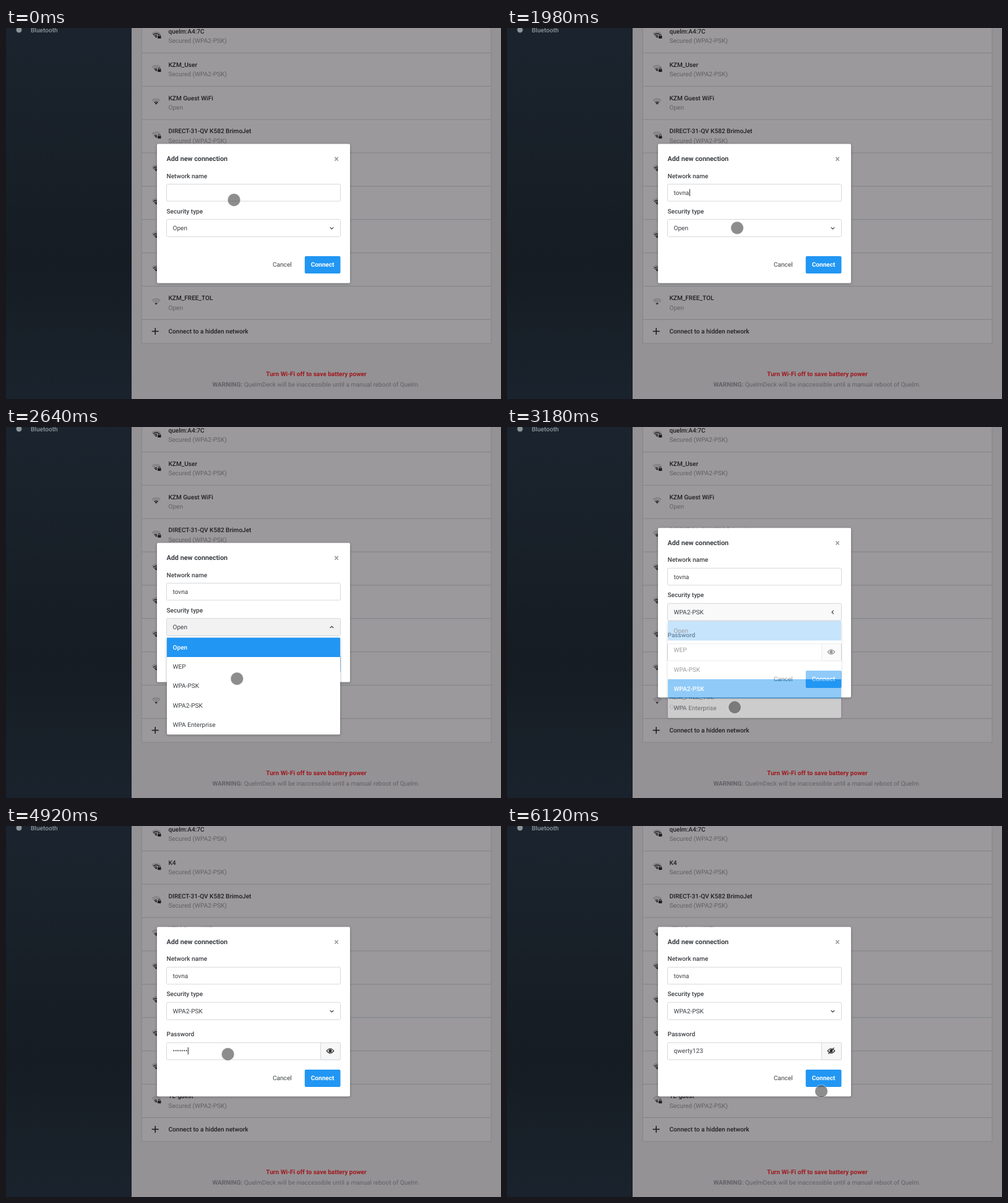
An HTML page for the animation above (6.18 s loop, 800 by 600 pixels).

```html
<!DOCTYPE html>
<html lang="en">
<head>
<meta charset="utf-8">
<title>Add new connection</title>
<style>
  html, body { margin: 0; width: 100%; height: 100%; overflow: hidden; background: #949295; }
  svg { display: block; }
  text { font: 10.08px Roboto, sans-serif; fill: #3c3f43; text-rendering: geometricPrecision; white-space: pre; }
  .m { font-weight: 500; }
  .b { font-weight: 700; }
  .box { fill: #fff; stroke: #d6d8dc; }
  .line { fill: none; stroke: #818386; }
</style>
</head>
<body>
<svg id="stage" width="800" height="600" viewBox="0 0 800 600"></svg>
<script>
const LOOP = 6180, STEP = 60;
const NAME = 'tovna', PASSWORD = 'qwerty123';
const OPTIONS = ['Open', 'WEP', 'WPA-PSK', 'WPA2-PSK', 'WPA Enterprise'];
const ROW_H = 31.3, BLUE = '#2196f3';

// y is the middle of the capitals
const text = (x, y, s, attrs = '') => `<text x="${x}" y="${y + 3.6}" ${attrs}>${s}</text>`;
const rect = (x, y, w, h, attrs) => `<rect x="${x}" y="${y}" width="${w}" height="${h}" ${attrs}/>`;

function wifi(x, y, level, locked) {
  const arcs = [1.6, 4.2, 6.8, 9.3].map((r, i) => {
    const d = r * 0.72;
    return `<path d="M${-d} ${-d}A${r} ${r} 0 0 1 ${d} ${-d}" fill="none"
      stroke="${i <= level ? '#1c1b1e' : '#7c7a7e'}" stroke-width="${i ? 1.4 : 2.4}"/>`;
  }).join('');
  const lock = locked ? rect(1.4, -5.2, 7, 6.5, 'fill="#9b999b"') +
    rect(2.4, -3.2, 5.4, 4.2, 'rx=".5" fill="#1c1b1e"') +
    '<path d="M3.6-3v-1a1.5 1.5 0 0 1 3 0v1" fill="none" stroke="#1c1b1e"/>' : '';
  return `<g transform="translate(${x} ${y + 5})">${arcs}${lock}</g>`;
}

function networks(id, rows) {
  return `<g id="${id}">` + rows.map(([name, level, locked], i) => {
    const y = 5 + i * 53.95;
    return wifi(242.7, y + 6, level, locked) + (name
      ? text(262.5, y, name, 'class="m" style="fill:#1f1e21"') +
        text(262.5, y + 15.7, locked ? 'Secured (WPA2-PSK)' : 'Open', 'style="fill:#626064"')
      : '');
  }).join('') + '</g>';
}

const unseen = Array(4).fill(['', 2, false]);
const printer = ['DIRECT-31-QV K582 BrimoJet', 1, true];
const device = ['quelm:A4:7C', 2, true];
const guest = ['KZM Guest WiFi', 1, false];

const page = `
  <linearGradient id="side" x2="0" y2="1">
    <stop stop-color="#1b242e"/><stop offset=".63" stop-color="#151c23"/><stop offset="1" stop-color="#1a232d"/>
  </linearGradient>
  <filter id="shadow" x="-10%" y="-10%" width="120%" height="125%">
    <feDropShadow dx="0" dy="1" stdDeviation="2" flood-opacity=".3"/>
  </filter>
  ${rect(0, 0, 800, 600, 'fill="#949295"')}
  ${rect(0, 0, 203, 600, 'fill="url(#side)"')}
  <circle cx="21" cy="3" r="4.5" fill="#8d9399"/>
  ${text(40, 3, 'Bluetooth', 'class="m" style="fill:#8d9399"')}
  ${rect(219.5, -10, 564.5, 520, 'fill="#9b999b" stroke="#858689"')}
  ${Array.from({ length: 9 }, (_, i) => `<path class="line" d="M220 ${40.3 + i * 53.9}h564"/>`).join('')}
  ${networks('before', [device, ['KZM_User', 1, true], guest, printer, ...unseen, ['KZM_FREE_TOL', 0, false]])}
  ${networks('after', [device, ['K4', 2, true], printer, guest, ...unseen, ['TL-guest', 1, true]])}
  <path d="M235.7 490.5h11M241.2 485v11" stroke="#1c1b1e" stroke-width="1.5"/>
  ${text(262.5, 490.3, 'Connect to a hidden network', 'class="m" style="fill:#1f1e21"')}
  ${text(501.5, 559.3, 'Turn Wi-Fi off to save battery power', 'class="b" text-anchor="middle" style="fill:#a01a20"')}
  ${text(501, 576.5, '<tspan class="b">WARNING:</tspan> QuelmDeck will be inaccessible until a manual reboot of Quelm.',
    'text-anchor="middle" style="fill:#626065"')}`;

const eye = `
  <g transform="translate(524 363.7)" fill="none" stroke="#2b2b2d" stroke-width="1.2">
    <path d="M-5.8 0Q0-7.4 5.8 0Q0 7.4-5.8 0Z"/><circle r="2" fill="#2b2b2d"/>
    <path id="slash" d="M-4.6 5L4.6-5"/>
  </g>`;

const options = OPTIONS.map((s, i) => {
  const y = 340.7 + i * ROW_H;
  return rect(260, y, 280, ROW_H, `id="fill${i}" fill="${BLUE}"`) +
    text(269.5, y + 15.5, s, `id="option${i}"`);
}).join('');

const dialog = `
  <rect id="panel" x="244" width="312" rx="2" fill="#fff" filter="url(#shadow)"/>
  <g id="password">
    ${text(259.5, 336.5, 'Password', 'class="m"')}
    ${rect(259.5, 350.5, 281, 27.5, 'rx="2" class="box"')}
    ${rect(508.5, 350.5, 32, 27.5, 'rx="2" class="box" style="fill:#f7f7f8"')}
    ${eye}
    ${text(269.5, 363.7, '', 'id="secret"')}
  </g>
  <g id="buttons">
    ${text(431, 382.7, 'Cancel')}
    ${rect(482.8, 369, 57.7, 28, `rx="2" fill="${BLUE}"`)}
    ${text(511.6, 382.7, 'Connect', 'class="b" text-anchor="middle" style="fill:#fff"')}
  </g>
  <g id="top">
    ${text(259.5, 211.5, 'Add new connection', 'class="b" style="font-size:10.8px"')}
    <path d="M531.4 208.9l5.4 5.8M536.8 208.9l-5.4 5.8" stroke="#98999c" stroke-width="1.6"/>
    ${text(259.5, 239, 'Network name', 'class="m"')}
    ${rect(259.5, 252.5, 281, 27.5, 'rx="2" class="box"')}
    ${text(269.5, 266.2, '', 'id="name"')}
    ${text(259.5, 296, 'Security type', 'class="m"')}
    ${rect(259.5, 309.5, 281, 28, 'rx="2" class="box" id="select"')}
    ${text(269.5, 323.3, '', 'id="choice"')}
    <path id="chevron" d="M-2.8-1.3L0 1.4L2.8-1.3" fill="none" stroke="#3c3f43" stroke-width="1.2"/>
    <g id="menu">
      ${rect(260, 340.7, 280, ROW_H * 5, 'rx="2" fill="#fff" filter="url(#shadow)"')}
      ${options}
    </g>
  </g>
  <path id="caret" stroke="#222"/>
  <circle id="pointer" r="10.3" fill="#505050" fill-opacity=".65" stroke="#fff" stroke-opacity=".35" stroke-width="1.2"/>`;

document.getElementById('stage').innerHTML = page + dialog;

const $ = id => document.getElementById(id);
const set = (id, attrs) => { for (const k in attrs) $(id).setAttribute(k, attrs[k]); };
const show = (id, on) => { $(id).style.display = on ? '' : 'none'; };
const ramp = (t, a, b) => Math.min(1, Math.max(0, (t - a) / (b - a)));
const typed = (t, start, gap, max) => Math.min(max, Math.max(0, Math.floor((t - start) / gap) + 1));

// time, x, y
const PATH = [
  [0, 368.5, 278], [1440, 368.5, 278], [1920, 372, 323.3], [2280, 372, 323.3],
  [2640, 373.3, 407], [2880, 369, 452], [3180, 368, 453.3], [3300, 366, 447],
  [3480, 359.3, 372.7], [3600, 358.6, 369], [5160, 358.6, 369], [5280, 400, 368],
  [5580, 521, 364], [5820, 521, 364], [6120, 508, 429]
];

function pointerAt(t) {
  const i = Math.max(1, PATH.findIndex(p => p[0] >= t));
  const [t0, x0, y0] = PATH[i - 1], [t1, x1, y1] = PATH[i];
  const k = ramp(t, t0, t1);
  return [x0 + (x1 - x0) * k, y0 + (y1 - y0) * k];
}

function drawCaret(t) {
  const inName = (t >= 120 && t < 480) || (t >= 720 && t < 2040);
  const inSecret = (t >= 3660 && t < 5640);
  show('caret', inName || inSecret);
  const x = 270.5 + $(inName ? 'name' : 'secret').getComputedTextLength();
  set('caret', { d: `M${x} ${inName ? 260.5 : 358}v11.5` });
}

function draw(t) {
  const secured = t >= 3120, revealed = t >= 5640, refreshed = t >= 3720;
  show('before', !refreshed);
  show('after', refreshed);

  set('panel', secured ? { y: 163.3, height: 274 } : { y: 187.5, height: 225 });
  set('top', { transform: `translate(0 ${secured ? -24.2 : 0})` });
  set('buttons', { transform: `translate(0 ${secured ? 25 : 0})` });
  show('password', secured);
  show('slash', revealed);

  $('name').textContent = NAME.slice(0, typed(t, 720, 165, NAME.length));
  const count = typed(t, 3960, 150, PASSWORD.length);
  $('secret').textContent = revealed ? PASSWORD : '•'.repeat(count);
  $('choice').textContent = secured ? 'WPA2-PSK' : 'Open';

  const open = ramp(t, 2040, 2220) * (1 - ramp(t, 3120, 3240));
  const shade = 255 - 13 * open;
  $('select').style.fill = `rgb(${shade},${shade},${shade + 1})`;
  set('chevron', { transform: `translate(526.5 323.7) rotate(${180 * open})` });
  set('menu', { opacity: open, transform: `translate(0 ${-5 * (1 - open)})` });
  show('menu', open > 0);
  const swap = ramp(t, 3060, 3300);
  OPTIONS.forEach((_, i) => {
    const picked = i === 0 ? 1 - swap : i === 3 ? Math.min(1, swap * 2) : 0;
    set('fill' + i, { opacity: picked });
    $('option' + i).style.fill = picked > 0.6 ? '#fff' : '#3c3f43';
    $('option' + i).style.fontWeight = picked > 0.6 ? 500 : 400;
  });

  drawCaret(t);
  const [cx, cy] = pointerAt(t);
  set('pointer', { cx, cy });
}

const start = performance.now();
function frame() {
  const t = (performance.now() - start) % LOOP;
  draw(Math.floor(t / STEP) * STEP);
  requestAnimationFrame(frame);
}
frame();
</script>
</body>
</html>
```
